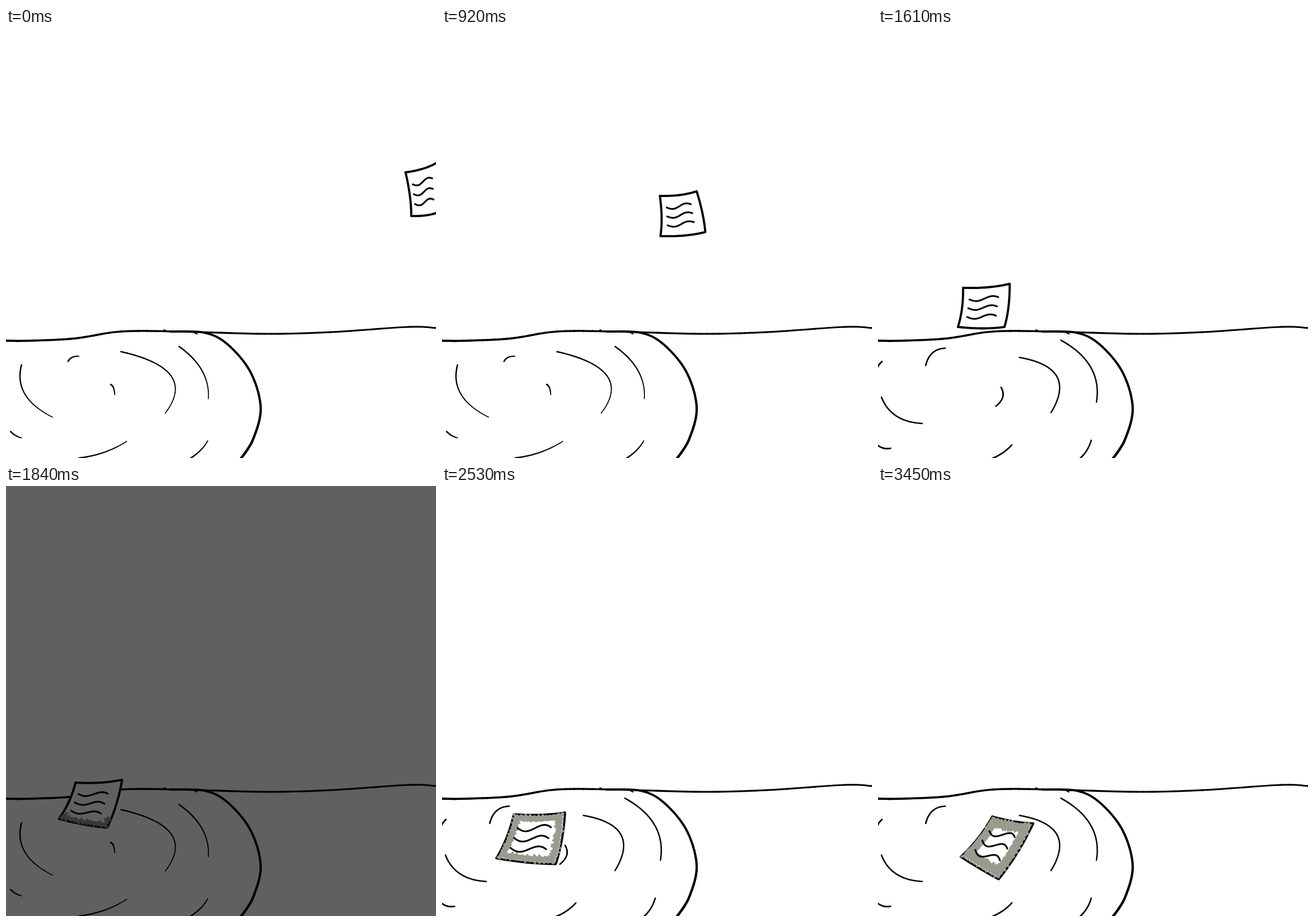
These frames come from a looping animation (748 by 748 pixels, 3.68 s). An HTML page with a canvas:

```html
<!DOCTYPE html>
<html lang="en">
<head>
<meta charset="utf-8">
<title>Paper drifting into the water</title>
<style>
  html, body { margin: 0; width: 100%; height: 100%; overflow: hidden; background: #fff; }
  canvas { display: block; width: 100vw; height: 100vh; }
</style>
</head>
<body>
<canvas id="stage" width="748" height="748"></canvas>
<script>
const ctx = document.getElementById('stage').getContext('2d');
const STEP = 230, STEPS = 16, SPLASH = 8;

const parse = text => text.split(' ').map(p => p.split(',').map(Number));
const mix = (a, b, k) => a + (b - a) * k;
const mixPoint = (p, q, k) => [mix(p[0], q[0], k), mix(p[1], q[1], k)];

const horizon = parse('0,544 40,544 120,540 200,528 300,528 450,532 565,529 700,520 749,522');
const overlap = parse('275,525 285,528 320,528 332,532');
const bowl = parse('285,528 345,530 385,550 425,598 443,660 430,715 408,750');

// Each ripple is an arc: start, middle, end.
const ripples = [
  ['27,586 33,637 81,677', '108,580 115,573 127,571', '182,620 187,626 189,638',
    '200,563 287,605 277,670', '301,554 341,596 352,645', '8,702 17,709 27,713',
    '127,748 171,738 210,719', '320,749 338,735 351,718'],
  ['7,580 1,587 -2,594', '6,642 32,675 77,688', '83,587 95,565 117,557',
    '214,625 217,642 205,658', '246,573 311,606 301,669', '318,543 370,590 380,651',
    '-2,725 10,731 22,731', '198,749 217,739 233,725', '351,749 363,735 371,717']
].map(set => set.map(parse));

// Sheet corners, clockwise from the top left, at the key steps.
const keys = [
  [0, '695,251 752,233 756,319 705,327'],
  [4, '379,292 443,284 458,355 380,362'],
  [7, '148,452 229,445 220,520 139,520'],
  [8, '121,516 202,511 176,594 92,579'],
  [9, '105,562 197,558 158,654 66,628'],
  [13, '145,580 231,578 238,661 123,667'],
  [15, '199,575 270,587 210,684 144,645']
].map(([step, corners]) => [step, parse(corners)]);

// The sheet floats in an arch between keys while it is in the air.
function pose(step) {
  const i = keys.findLastIndex(([at]) => at <= step);
  const [t0, from] = keys[i], [t1, to] = keys[i + 1] || [t0 + 1, from];
  const k = (step - t0) / (t1 - t0);
  const lift = step < SPLASH ? 15 * Math.sin(Math.PI * k) : 0;
  return from.map((p, n) => {
    const [x, y] = mixPoint(p, to[n], k);
    return [x, y - lift];
  });
}

function random(seed) {
  return () => (seed = (seed * 16807) % 2147483647) / 2147483647;
}

// Smooth curve through all points.
function spline(pts, n = 12) {
  const out = [pts[0]], at = i => pts[Math.max(0, Math.min(pts.length - 1, i))];
  for (let i = 0; i < pts.length - 1; i++) {
    const [a, b, c, d] = [at(i - 1), at(i), at(i + 1), at(i + 2)];
    for (let j = 1; j <= n; j++) {
      const t = j / n;
      out.push([0, 1].map(m => b[m] + 0.5 * t * (c[m] - a[m] +
        t * (2 * a[m] - 5 * b[m] + 4 * c[m] - d[m] + t * (3 * (b[m] - c[m]) + d[m] - a[m])))));
    }
  }
  return out;
}

// Parabola through a start, a middle and an end.
function arc([a, m, b], n = 24) {
  const c = [0, 1].map(i => 2 * m[i] - (a[i] + b[i]) / 2);
  return Array.from({ length: n + 1 }, (_, i) => {
    const t = i / n;
    return mixPoint(mixPoint(a, c, t), mixPoint(c, b, t), t);
  });
}

function trace(pts) {
  ctx.beginPath();
  pts.forEach(p => ctx.lineTo(...p));
}

function line(pts, width, color = '#000') {
  trace(pts);
  ctx.lineWidth = width;
  ctx.strokeStyle = color;
  ctx.stroke();
}

function taper(pts, w0, w1) {
  for (let i = 1; i < pts.length; i++) line([pts[i - 1], pts[i]], mix(w0, w1, i / pts.length));
}

// Grey soaked rim along part of the edge: a solid band with loose strokes across it.
function rim(edge, center, depth, color, rnd, start = 0, end = 1) {
  const inset = (f, d) => mixPoint(edge[Math.floor(f * (edge.length - 1))], center, d / 44);
  const band = [];
  for (let f = start; f <= end; f += 0.01) band.push(inset(f, depth / 2 + 1 + rnd()));
  line(band, depth - 2, color);
  for (let f = start; f < end; f += 0.02) {
    const slant = Math.min(end, f + 0.03 * rnd());
    line([inset(f, 3 * rnd()), inset(slant, depth + 3 * rnd() - 1)], 4, color);
  }
}

// Three wavy lines of writing, placed inside the corners.
function writing([a, b, c, d], swing) {
  for (const row of [0.31, 0.53, 0.75]) {
    const wave = [];
    for (let s = 0; s <= 1; s += 0.05) {
      const u = mix(0.17, 0.82, s), v = row + swing * Math.sin(2 * Math.PI * s);
      wave.push(mixPoint(mixPoint(a, b, u), mixPoint(d, c, u), v));
    }
    line(wave, 3);
  }
}

function paper(step, fill) {
  const corners = pose(step), rnd = random(step * 977 + 5);
  const center = mixPoint(mixPoint(corners[0], corners[2], 0.5), mixPoint(corners[1], corners[3], 0.5), 0.5);
  // All sides bend the same way, as if pushed by a draught.
  const edge = corners.flatMap((p, i) => {
    const q = corners[(i + 1) % 4], [x, y] = mixPoint(p, q, 0.5);
    return arc([p, [x + 2.5, y + 2.5], q]);
  });
  trace(edge);
  ctx.fillStyle = fill;
  ctx.fill();
  line(edge, 3.8);
  if (step === SPLASH) rim(edge, center, 8, '#383838', rnd, 0.46, 0.78);
  if (step > SPLASH) rim(edge, center, Math.min(16, 7 + 2.3 * (step - 9)), '#999b8f', rnd);
  writing(corners, step > SPLASH ? 0.07 : 0.05);
}

function draw(step) {
  const fill = step === SPLASH ? '#606060' : '#fff';
  ctx.fillStyle = fill;
  ctx.fillRect(0, 0, 748, 748);
  taper(spline(horizon), 3.8, 2.7);
  line(spline(overlap), 2.2);
  taper(spline(bowl), 3.4, 4.3);
  ripples[step % 2].forEach(r => taper(arc(r), 2.5, step % 2 ? 2.3 : 1.5));
  paper(step, fill);
}

ctx.lineCap = ctx.lineJoin = 'round';
const begin = performance.now();
let shown = -1;
function tick() {
  const step = Math.floor((performance.now() - begin) / STEP) % STEPS;
  if (step !== shown) draw(shown = step);
  requestAnimationFrame(tick);
}
tick();
</script>
</body>
</html>
```
